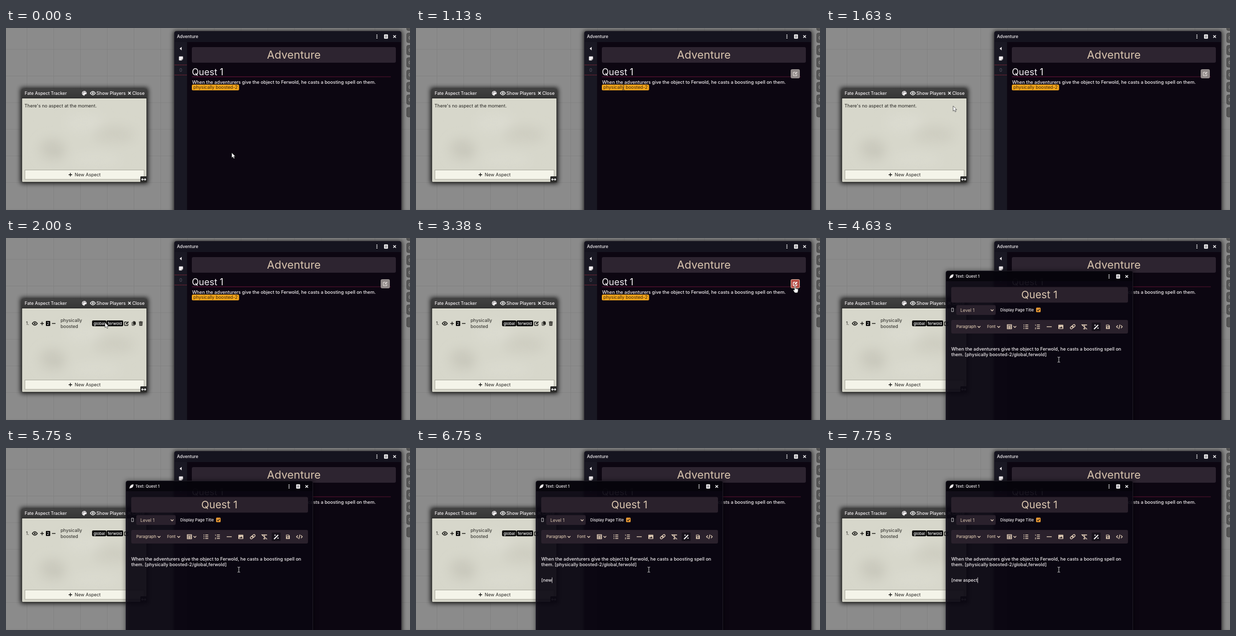
Recreate the animation shown at these times as an HTML page. Size 800 px wide and 362 px high, loop 8000 ms.

```html
<!DOCTYPE html>
<html lang="en">
<head>
<meta charset="utf-8">
<title>Aspect tracker</title>
<style>
  html, body { margin: 0; width: 100%; height: 100%; overflow: hidden; background: #8a8a8a; }
  svg { display: block; width: 800px; height: 362px; }
  text { font: 500 9px Inter, "Open Sans", sans-serif; white-space: pre; }
  .thin { font-weight: 400; }
  .small { font-size: 8px; }
  .label { font-size: 7.8px; }
  .body { font-size: 9.08px; }
  .tag { font-size: 7.8px; fill: #fff; }
  .mid { text-anchor: middle; }
  .light { fill: #f4f0f2; }
  .sand { fill: #d9c5ae; }
  .ink { fill: #24231f; }
  .line { fill: none; stroke: currentColor; stroke-width: 1.4; }
  .solid { fill: currentColor; }
</style>
</head>
<body>
<svg viewBox="0 0 800 362" xmlns="http://www.w3.org/2000/svg">
  <defs>
    <pattern id="grid" x="41" y="42" width="53" height="53" patternUnits="userSpaceOnUse">
      <path d="M0 .5H53M.5 0V53" stroke="#777" stroke-opacity=".45"/>
    </pattern>
    <linearGradient id="bar" x2="0" y2="1">
      <stop stop-color="#414141"/><stop offset="1" stop-color="#363636"/>
    </linearGradient>
    <linearGradient id="rule">
      <stop stop-color="#7a1540"/><stop offset="1" stop-color="#56112f"/>
    </linearGradient>
    <filter id="shade" x="-20%" y="-20%" width="140%" height="140%"><feGaussianBlur stdDeviation="5"/></filter>
    <filter id="soft" x="-50%" y="-50%" width="200%" height="200%"><feGaussianBlur stdDeviation="11"/></filter>
    <filter id="mottle" x="0" y="0" width="1" height="1">
      <feTurbulence type="fractalNoise" baseFrequency=".03" numOctaves="4" seed="4"/>
      <feColorMatrix values="0 0 0 0 .68  0 0 0 0 .68  0 0 0 0 .6  1 0 0 0 -.3"/>
    </filter>
    <clipPath id="paper"><rect x="32" y="139" width="246" height="167"/></clipPath>

    <!-- icons, centred on 0,0 -->
    <path id="plus" class="line" d="M-3.5 0H3.5M0-3.5V3.5"/>
    <path id="minus" class="line" d="M-3.5 0H3.5"/>
    <path id="cross" class="line" d="M-2.6-2.6 2.6 2.6M-2.6 2.6 2.6-2.6"/>
    <path id="down" class="line" d="M-2.7-1.3 0 1.4 2.7-1.3"/>
    <g id="dots" class="solid"><circle cy="-3" r="1.1"/><circle r="1.1"/><circle cy="3" r="1.1"/></g>
    <g id="page"><rect x="-3.8" y="-4.2" width="7.6" height="8.4" rx="1" class="solid"/>
      <path d="M-2-1.7H2M-2 0H2M-2 1.7H2" stroke="#15131d" stroke-width=".7"/></g>
    <g id="tools"><use href="#dots" x="-35"/><use href="#page" x="-17"/><use href="#cross"/></g>
    <g id="eye"><path d="M-5 0Q0-7 5 0Q0 7-5 0Z" class="line"/><circle r="1.7" class="solid"/></g>
    <g id="edit"><path d="M.5-3H-3A1 1 0 0 0-4-2V3A1 1 0 0 0-3 4H2A1 1 0 0 0 3 3V.5" class="line"/>
      <path d="M-1.5 1.7-1-.3 3-4.3 4.6-2.7.6 1.3Z" class="solid"/></g>
    <path id="spark" class="solid" d="M0-2 .6-.6 2 0 .6.6 0 2-.6.6-2 0-.6-.6Z"/>
  </defs>

  <rect width="800" height="362" fill="#8b8b8b"/>
  <rect width="800" height="362" fill="url(#grid)"/>
  <g id="controls"></g>

  <!-- aspect tracker -->
  <rect x="29" y="119" width="252" height="190" fill="#000" opacity=".9" filter="url(#shade)"/>
  <rect x="31.5" y="121.5" width="247" height="185" rx="2" fill="#d7d7cb" stroke="#3c3c39"/>
  <g clip-path="url(#paper)">
    <g filter="url(#soft)">
      <ellipse cx="92" cy="242" rx="25" ry="21" fill="#c8c7bb"/>
      <ellipse cx="215" cy="212" rx="42" ry="17" fill="#cecdc1"/>
      <ellipse cx="155" cy="188" rx="38" ry="17" fill="#dcdcd1"/>
      <ellipse cx="178" cy="262" rx="48" ry="13" fill="#dbdbd0"/>
    </g>
    <rect x="31" y="139" width="248" height="168" filter="url(#mottle)" opacity=".35"/>
  </g>
  <path d="M31 139V123a2 2 0 0 1 2-2H277a2 2 0 0 1 2 2V139Z" fill="url(#bar)"/>
  <path d="M31 139.5H279" stroke="#1c1c1c"/>
  <g color="#f5f5f5" class="light">
    <text x="37" y="133" style="font-size:8.7px">Fate Aspect Tracker</text>
    <path d="M155 125.2a4.6 4.6 0 1 0 0 9.2c1.4 0 .6-1.8 1.4-2.4s3.3.6 3.3-2.3a4.6 4.6 0 0 0-4.7-4.5Z"/>
    <g fill="#333"><circle cx="152.4" cy="129.6" r=".8"/><circle cx="154" cy="127.4" r=".8"/><circle cx="157" cy="127.8" r=".8"/></g>
    <use href="#eye" x="172" y="129.7"/>
    <text x="179" y="133">Show Players</text>
    <use href="#cross" x="244.5" y="129.7"/>
    <text x="250" y="133">Close</text>
  </g>
  <text id="empty" class="ink thin" x="36.5" y="157.5">There's no aspect at the moment.</text>

  <g id="aspect" class="ink" color="#171714">
    <text class="thin" x="39.5" y="173">1.</text>
    <use href="#eye" x="57" y="170"/>
    <use href="#plus" x="71.5" y="170"/>
    <rect x="79" y="165" width="8.5" height="10" rx="1" fill="#000"/>
    <text class="tag mid" x="83.2" y="173">2</text>
    <use href="#minus" x="94.5" y="170"/>
    <text class="thin" x="108" y="167">physically</text>
    <text class="thin" x="108" y="178.5">boosted</text>
    <rect x="170.5" y="164" width="28" height="11.5" rx="2" fill="#000"/>
    <rect x="199" y="164" width="33" height="11.5" rx="2" fill="#000"/>
    <text class="tag mid" x="184.6" y="172.5">global</text>
    <text class="tag mid" x="215.5" y="172.5">ferwold</text>
    <use href="#edit" x="238.5" y="170"/>
    <path d="M251.5 165.5h3.5l2 2v5h-5.5Z"/>
    <path d="M251 167.8h-1.3v6h4.6v-1.3" class="line" style="stroke-width:1"/>
    <path d="M263 166.2h2.4l.6-.8h2l.6.8h2.4v1.2h-8ZM263.6 168h6.8l-.5 6.5h-5.8Z"/>
    <path d="M265.6 169.2v4M267 169.2v4M268.4 169.2v4" stroke="#d4d2c8" stroke-width=".6"/>
  </g>

  <rect x="37.5" y="282.5" width="236" height="18.5" fill="#f4f4e9" stroke="#aaa99d"/>
  <g color="#171714" class="ink">
    <use href="#plus" x="127.5" y="291.7"/>
    <text class="thin" x="136" y="295">New Aspect</text>
  </g>
  <path d="M266 307V296.5a1.5 1.5 0 0 1 1.5-1.5H279V307Z" fill="#2b2b29"/>
  <path d="M269 301.3H276.5M270.8 299.2 268.6 301.3 270.8 303.4M274.7 299.2 276.9 301.3 274.7 303.4" fill="none" stroke="#fff" stroke-width="1.2"/>

  <!-- journal -->
  <rect x="332" y="6" width="452" height="375" fill="#000" opacity=".85" filter="url(#shade)"/>
  <rect x="333.5" y="6.5" width="449" height="375" rx="4" fill="#0c0611" stroke="#1f1c27"/>
  <path d="M334 28V10a3 3 0 0 1 3-3H779a3 3 0 0 1 3 3V28Z" fill="#15141f"/>
  <path d="M334 28H358.5V362H334Z" fill="#191823"/>
  <g class="light" color="#fff">
    <text x="338.5" y="20.2" style="font-size:8.5px">Adventure</text>
    <use href="#tools" x="769.5" y="17"/>
    <path d="M347.8 37.5V44.5L343.8 41Z"/>
    <path d="M343.5 56.5h6a1 1 0 0 1 1 1V62l-2.5 2.5h-4.5a1 1 0 0 1-1-1v-6a1 1 0 0 1 1-1Z"/>
    <path d="M348 64.5V62h2.5" fill="none" stroke="#555" stroke-width=".7"/>
  </g>
  <path d="M334 73.5H358M334 93.5H358" stroke="#a3293c" stroke-dasharray="1.5 1"/>
  <text class="mid thin" x="346" y="87" fill="#625d6a">0</text>
  <rect x="368" y="38" width="404" height="31" rx="3" fill="#2d2430"/>
  <text class="sand mid thin" x="570" y="61.3" style="font-size:21.8px">Adventure</text>
  <text class="light thin" x="368" y="94" style="font-size:18px">Quest 1</text>
  <path d="M368 96.5H762V97.5H368Z" fill="url(#rule)"/>
  <text class="light body" x="368.5" y="110.5">When the adventurers give the object to Ferwold, he casts a boosting spell on them.</text>
  <rect x="368" y="112.5" width="93.5" height="11.5" rx="2.5" fill="#f4a51c"/>
  <text class="thin" x="371" y="121.3" fill="#38260a" style="font-size:8.9px">physically boosted-2</text>
  <g id="pen">
    <rect x="742.5" y="82.5" width="17" height="17" rx="2"/>
    <use href="#edit" x="751" y="91"/>
  </g>

  <!-- page editor -->
  <g id="editor">
    <rect x="237" y="65" width="372" height="320" fill="#000" opacity=".5" filter="url(#shade)"/>
    <rect x="237.5" y="65.5" width="370" height="320" rx="4" fill="#0b0813" fill-opacity=".87" stroke="#211e28"/>
    <path d="M238 86V69a3 3 0 0 1 3-3H604a3 3 0 0 1 3 3V86Z" fill="#06040b" fill-opacity=".8"/>
    <g class="light" color="#fff">
      <path d="M244.5 80.5C245 75 248.5 72 252.5 72.2C252.5 76 250.5 79.8 246.5 79.5L245.2 80.8Z"/>
      <text class="label" x="256" y="79.3">Text: Quest 1</text>
      <use href="#tools" x="595.5" y="76.5"/>
    </g>
    <g fill="#2a212c">
      <rect x="248" y="97.5" width="350" height="31" rx="3"/>
      <rect x="258" y="133.5" width="78" height="19.5" rx="3"/>
      <rect x="248" y="163" width="350" height="27" rx="3"/>
    </g>
    <text class="sand mid thin" x="422.5" y="120" style="font-size:20.7px">Quest 1</text>
    <rect x="248.7" y="139.5" width="3.6" height="7" fill="none" stroke="#ddd" stroke-width=".8"/>
    <text class="sand thin" x="266" y="146.5" style="font-size:8.8px">Level 1</text>
    <text class="light label" x="345" y="146">Display Page Title</text>
    <rect x="416" y="138.5" width="9" height="9" rx="1.5" fill="#eb9a33"/>
    <path d="M418 143 420 145 423.3 141" fill="none" stroke="#2a1d10" stroke-width="1.2"/>
    <rect x="526" y="168" width="18" height="17" rx="2" fill="#17121b"/>
    <g color="#e3cfb8" class="sand">
      <use href="#down" x="329" y="143.5"/>
      <text class="small" x="258" y="179.3">Paragraph</text><use href="#down" x="303" y="176.5"/>
      <text class="small" x="319" y="179.3">Font</text><use href="#down" x="342" y="176.5"/>
      <path class="line" d="M359 172.5h8.5v8H359ZM359 175.3h8.5M359 178h8.5M363.2 175v5.5"/>
      <use href="#down" x="374" y="176.5"/>
      <path class="line" d="M394.5 173h6M394.5 176.5h6M394.5 180h6M391 173h1.7M391 176.5h1.7M391 180h1.7"/>
      <path class="line" d="M417.5 173h6M417.5 176.5h6M417.5 180h6"/>
      <path class="line" style="stroke-width:.9" d="M414 172.5h1V175M414 178.5h1.5L414 181h1.8"/>
      <path class="line" d="M437 176.5h10"/>
      <path fill-rule="evenodd" d="M461 172.5h8a1 1 0 0 1 1 1v6.5a1 1 0 0 1-1 1h-8a1 1 0 0 1-1-1v-6.5a1 1 0 0 1 1-1ZM461.5 179.7h7.2l-2.5-4-2 2.7-1-1.2Z"/>
      <g transform="rotate(-40 488.5 176.5)" class="line"><rect x="483" y="174.4" width="6.5" height="4.2" rx="2.1"/><rect x="487.5" y="174.4" width="6.5" height="4.2" rx="2.1"/></g>
      <path class="line" d="M508 174v-1.3h8V174M512.5 173l-1.3 7.5M509.5 180.7h4M506 172l11 9.5"/>
      <g color="#fff">
        <path class="line" style="stroke-width:2.2" d="M530.8 181.2 539 173"/>
        <use href="#spark" x="532.8" y="173.3"/><use href="#spark" x="538.6" y="179.2"/>
      </g>
      <path fill-rule="evenodd" d="M554.5 172.5h5.5l2 2v6.5h-7.5ZM555.7 173.7v2h4v-2ZM558.2 177a1.4 1.4 0 1 0 .01 0Z"/>
      <path class="line" d="M578 173.8 575.3 176.5 578 179.2M584 173.8 586.7 176.5 584 179.2M582.2 172.2 579.8 181"/>
    </g>
    <g class="light">
      <text class="body" x="248" y="223.5">When the adventurers give the object to Ferwold, he casts a boosting spell on</text>
      <text id="second" x="248" y="234.5">them. [physically boosted-2/global,ferwold]</text>
      <text id="typed" x="248" y="266.3" style="font-size:8.9px"></text>
      <rect id="caret" width=".8" height="11"/>
    </g>
  </g>

  <g id="cursor">
    <path id="arrow" d="M0 0V10.2L2.3 8.2 4 11.8 5.8 11 4.2 7.5H7.2Z" fill="#fff" stroke="#222" stroke-width=".7"/>
    <path id="beam" d="M-2.5-5H-1Q0-5 0-4Q0-5 1-5H2.5M0-4V4M-2.5 5H-1Q0 5 0 4Q0 5 1 5H2.5" fill="none"/>
    <path id="hand" d="M-1.6-1.5a1.1 1.1 0 0 1 2.2 0V2.5l4 .8a1.5 1.5 0 0 1 1.3 1.7L5.3 8.5 4.3 11H-.8L-4 6.3a1 1 0 0 1 1.5-1.2l.9.9Z" fill="#fff" stroke="#222" stroke-width=".7"/>
  </g>
</svg>
<script>
const LOOP = 8000;
const $ = id => document.getElementById(id);
const show = (id, on) => $(id).setAttribute('display', on ? 'inline' : 'none');
const attrs = (el, map) => Object.entries(map).forEach(([k, v]) => el.setAttribute(k, v));

// The picture changes on an eighth-second beat, rounded to 10 ms.
const beatStart = n => Math.round(n * 12.5) * 10;
function beatAt(t) {
  const n = Math.floor(t / 125);
  return t < beatStart(n) ? n - 1 : n;
}

// [beat, x, y]
const path = [
  [0, 447, 248], [8, 411, 118], [9, 411, 118], [15, 196, 168], [18, 196, 168],
  [26, 751, 98], [28, 751, 98], [35, 461, 242], [64, 461, 242]
];
const ease = u => u * u * (3 - 2 * u);
function cursorAt(n) {
  const i = path.findIndex((p, j) => n < path[j + 1][0]);
  const [a, x, y] = path[i], [b, x2, y2] = path[i + 1];
  const u = ease((n - a) / (b - a));
  return [x + (x2 - x) * u, y + (y2 - y) * u];
}
function cursorKind(n) {
  if (n === 8 || n === 9 || n >= 34) return 'beam';
  return n >= 26 && n <= 28 ? 'hand' : 'arrow';
}

// Beat at which each letter is typed: slow at first, then one per beat.
const phrase = '[new aspect';
const keyBeats = [48, 50, 52, 54, 55, 56, 57, 58, 59, 60, 62];
const typedAt = n => phrase.slice(0, keyBeats.filter(b => b <= n).length);

function drawCaret(n) {
  const onNewLine = n >= 42;
  const row = onNewLine ? $('typed') : $('second');
  show('caret', n >= 40 && !(n >= 46 && n < 48));
  const width = row.textContent ? row.getComputedTextLength() : 0;
  attrs($('caret'), { x: 248 + width, y: onNewLine ? 257.5 : 226 });
}

function draw(n) {
  const dropped = n >= 15, open = n >= 28, hover = n >= 26;
  show('empty', !dropped);
  show('aspect', dropped);
  show('pen', n >= 7 && n < 29);
  attrs($('pen'), { color: hover ? '#fff' : '#d9d3d0' });
  attrs($('pen').firstElementChild, {
    fill: hover ? '#b64a43' : '#8c8584', stroke: hover ? '#e0c4ae' : '#a39c9a'
  });
  show('editor', open);
  $('typed').textContent = typedAt(n);
  drawCaret(n);

  const [x, y] = cursorAt(n), kind = cursorKind(n);
  attrs($('cursor'), { transform: `translate(${x} ${y})` });
  ['arrow', 'beam', 'hand'].forEach(k => show(k, k === kind));
  attrs($('beam'), { stroke: n < 20 ? '#5d4a2c' : '#d8d8d8' });
}

// Tool buttons cut off by the right edge
$('controls').innerHTML = [-14, 10, 34.5, 59, 83.5, 108, 133, 158].map((y, i) =>
  `<rect x="793.5" y="${y}" width="22" height="19" rx="3" fill="#565656" stroke="#454545"/>` +
  (i && i < 7 ? `<circle cx="801" cy="${y + 9.5}" r="3" fill="none" stroke="#8f8f8f" stroke-width="1.2"/>` : '')
).join('');

let last = -1;
function tick() {
  const n = beatAt(performance.now() % LOOP);
  if (n !== last) draw(last = n);
  requestAnimationFrame(tick);
}
tick();
</script>
</body>
</html>
```
